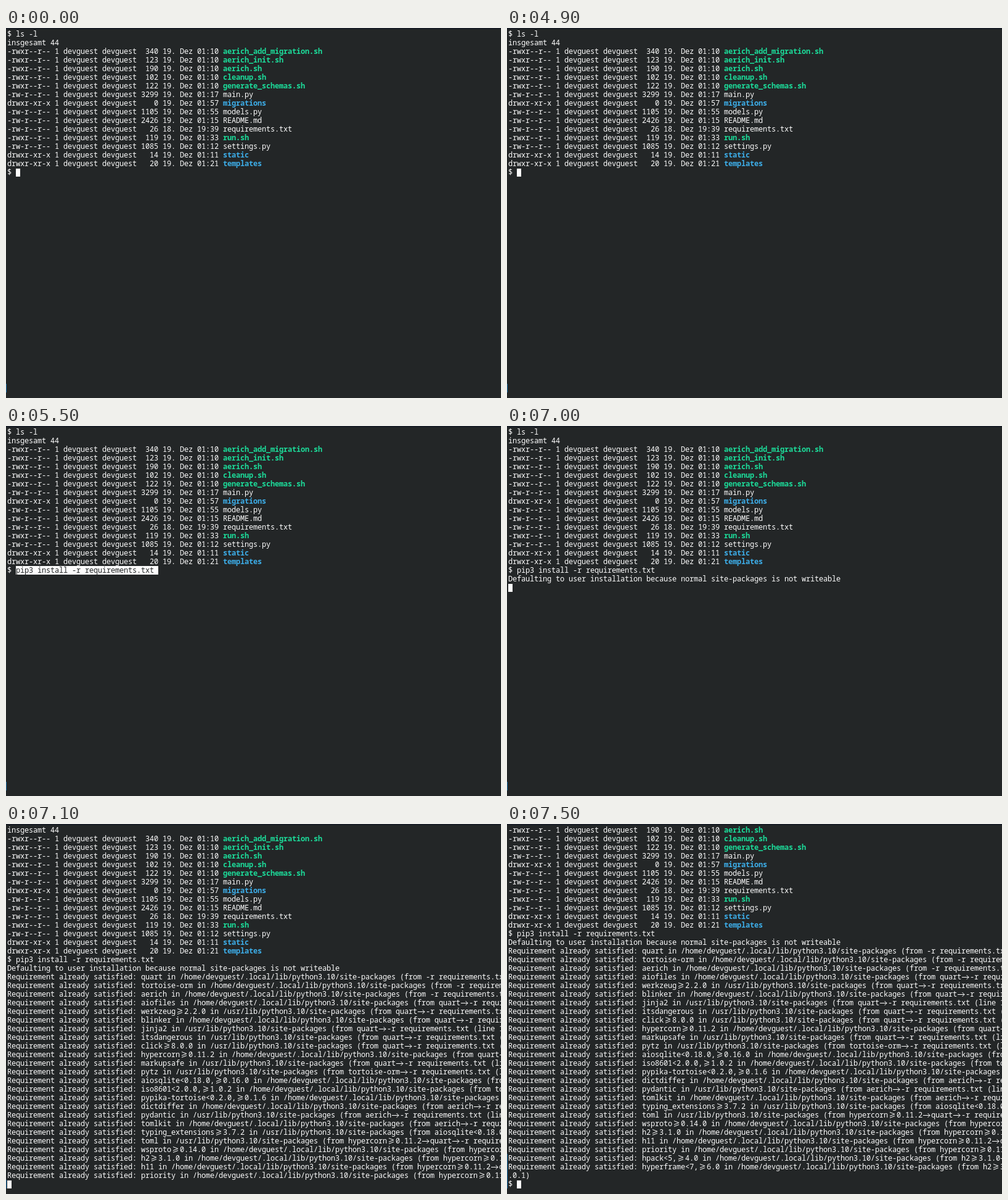
Recreate the animation shown at these times as an HTML page with a canvas. Size 803 by 600 pixels, loop 8000 ms.

```html
<!DOCTYPE html>
<html lang="de">
<head>
<meta charset="utf-8">
<title>Terminal</title>
<style>
html, body { margin: 0; width: 100%; height: 100%; overflow: hidden; background: #232627; }
canvas { display: block; }
</style>
</head>
<body>
<canvas id="screen" width="803" height="600"></canvas>
<script>
const ctx = document.getElementById('screen').getContext('2d');
const LOOP = 8000, CW = 7, CH = 14, LEFT = 2, TOP = 3, COLS = 115, LAST_ROW = 41;
const BG = '#232627', FG = '#fcfcfc', GREEN = '#1cdc9a', BLUE = '#3daee9';
const FONT = '12px "Noto Sans Mono", "DejaVu Sans Mono", monospace';
const USER = 'devguest';
const COMMAND = 'pip3 install -r requirements.txt';

// size, date, file name
const files = `340 19. Dez 01:10 aerich_add_migration.sh
123 19. Dez 01:10 aerich_init.sh
190 19. Dez 01:10 aerich.sh
102 19. Dez 01:10 cleanup.sh
122 19. Dez 01:10 generate_schemas.sh
3299 19. Dez 01:17 main.py
0 19. Dez 01:57 migrations
1105 19. Dez 01:55 models.py
2426 19. Dez 01:15 README.md
26 18. Dez 19:39 requirements.txt
119 19. Dez 01:33 run.sh
1085 19. Dez 01:12 settings.py
14 19. Dez 01:11 static
20 19. Dez 01:21 templates`.split('\n').map(fileLine);

// package, install location, chain of dependants
const packages = `quart|home|
tortoise-orm|home|
aerich|home|
aiofiles|home|quart
werkzeug>=2.2.0|usr|quart
blinker|home|quart
jinja2|usr|quart
itsdangerous|usr|quart
click>=8.0.0|usr|quart
hypercorn>=0.11.2|home|quart
markupsafe|usr|quart
pytz|usr|tortoise-orm
aiosqlite<0.18.0,>=0.16.0|home|tortoise-orm
iso8601<2.0.0,>=1.0.2|home|tortoise-orm
pypika-tortoise<0.2.0,>=0.1.6|home|tortoise-orm
dictdiffer|home|aerich
pydantic|usr|aerich
tomlkit|home|aerich
typing_extensions>=3.7.2|usr|aiosqlite<0.18.0,>=0.16.0->tortoise-orm
toml|usr|hypercorn>=0.11.2->quart
wsproto>=0.14.0|home|hypercorn>=0.11.2->quart
h2>=3.1.0|home|hypercorn>=0.11.2->quart
h11|home|hypercorn>=0.11.2->quart
priority|home|hypercorn>=0.11.2->quart
hpack<5,>=4.0|home|h2>=3.1.0->hypercorn>=0.11.2->quart
hyperframe<7,>=6.0|home|h2>=3.1.0->hypercorn>=0.11.2->quart`.split('\n').map(packageLine);

const listing = [{ text: '$ ls -l' }, { text: 'insgesamt 44' }, ...files];
const notice = 'Defaulting to user installation because normal site-packages is not writeable';
const installed = [...listing, { text: '$ ' + COMMAND }, { text: notice }, ...packages];

function fileLine(row) {
  const [size, ...rest] = row.split(' ');
  const name = rest.pop();
  const isDir = !name.includes('.'), isScript = name.endsWith('.sh');
  const mode = isDir ? 'drwxr-xr-x' : isScript ? '-rwxr--r--' : '-rw-r--r--';
  return {
    text: `${mode} 1 ${USER} ${USER} ${size.padStart(4)} ${rest.join(' ')} `,
    name,
    color: isDir ? BLUE : isScript ? GREEN : FG,
    bold: isDir || isScript
  };
}

function packageLine(row) {
  const [name, place, chain] = row.split('|');
  const root = place === 'home' ? `/home/${USER}/.local` : '/usr';
  const via = chain && chain + '->';
  return { text: `Requirement already satisfied: ${name} in ${root}/lib/python3.10/site-packages (from ${via}-r requirements.txt (line 1))` };
}

const rowY = row => TOP + row * CH;
const colX = col => LEFT + col * CW;

function stroke(...lines) {
  ctx.beginPath();
  for (const line of lines) line.forEach(([x, y], i) => i ? ctx.lineTo(x, y) : ctx.moveTo(x, y));
  ctx.stroke();
}

// Ligatures that span two cells
const ligatures = {
  '->': (x, y) => stroke([[x + 1, y + 7.5], [x + 12, y + 7.5]], [[x + 8.5, y + 4], [x + 12, y + 7.5], [x + 8.5, y + 11]]),
  '>=': (x, y) => stroke([[x + 3, y + 2.5], [x + 11, y + 5.5], [x + 3, y + 8.5]], [[x + 3, y + 11.5], [x + 11, y + 8.5]])
};

function print(text, col, row, color = FG, bold = false) {
  ctx.font = (bold ? 'bold ' : '') + FONT;
  ctx.fillStyle = ctx.strokeStyle = color;
  const y = rowY(row);
  for (let i = 0; i < text.length && col + i < COLS; i++) {
    const draw = ligatures[text.slice(i, i + 2)];
    if (draw) draw(colX(col + i++), y);
    else if (text[i] !== ' ') ctx.fillText(text[i], colX(col + i) + CW / 2, y + 11);
  }
}

function cursor(col, row, hollow) {
  const x = colX(col), y = rowY(row) + 1;
  ctx.fillStyle = ctx.strokeStyle = FG;
  if (hollow) ctx.strokeRect(x + 0.5, y + 0.5, CW - 1, CH - 2);
  else ctx.fillRect(x, y, CW, CH - 1);
}

function state(t) {
  const prompt = listing.length;
  if (t < 5500) return { lines: [...listing, { text: '$' }], at: [2, prompt], hollow: t >= 1200 && t < 4900 };
  const typed = installed.slice(0, prompt + 1);
  if (t < 6900) return { lines: typed, at: [2 + COMMAND.length, prompt], selected: t < 6500 };
  if (t < 7000) return { lines: typed, at: [0, prompt + 1] };
  if (t < 7100) return { lines: installed.slice(0, prompt + 2), at: [0, prompt + 2] };
  if (t < 7200) return { lines: installed.slice(1, -2), at: [0, LAST_ROW] };
  const ready = t >= 7400;
  return {
    lines: [...installed.slice(4), { text: '.0.1)' }, { text: ready ? '$' : '' }],
    at: [ready ? 2 : 0, LAST_ROW],
    fresh: t >= 7500 ? 4 : 1
  };
}

function render(t) {
  const { lines, at, hollow, selected, fresh = 1 } = state(t);
  ctx.fillStyle = BG;
  ctx.fillRect(0, 0, 803, 600);
  ctx.fillStyle = '#171c24';
  ctx.fillRect(0, 0, 803, 2);
  // Marker beside newly scrolled lines
  ctx.fillStyle = '#1d6fa8';
  ctx.fillRect(0, rowY(LAST_ROW + 1 - fresh), 1, fresh * CH);

  lines.forEach((line, row) => {
    print(line.text, 0, row);
    if (line.name) print(line.name, line.text.length, row, line.color, line.bold);
  });
  cursor(...at, hollow);
  if (selected) {
    ctx.fillStyle = FG;
    ctx.fillRect(colX(2), rowY(at[1]), (COMMAND.length + 1) * CW, CH);
    print(COMMAND, 2, at[1], BG);
  }
}

ctx.textAlign = 'center';
const start = performance.now();
function tick() {
  render((performance.now() - start) % LOOP);
  requestAnimationFrame(tick);
}
tick();
</script>
</body>
</html>
```
